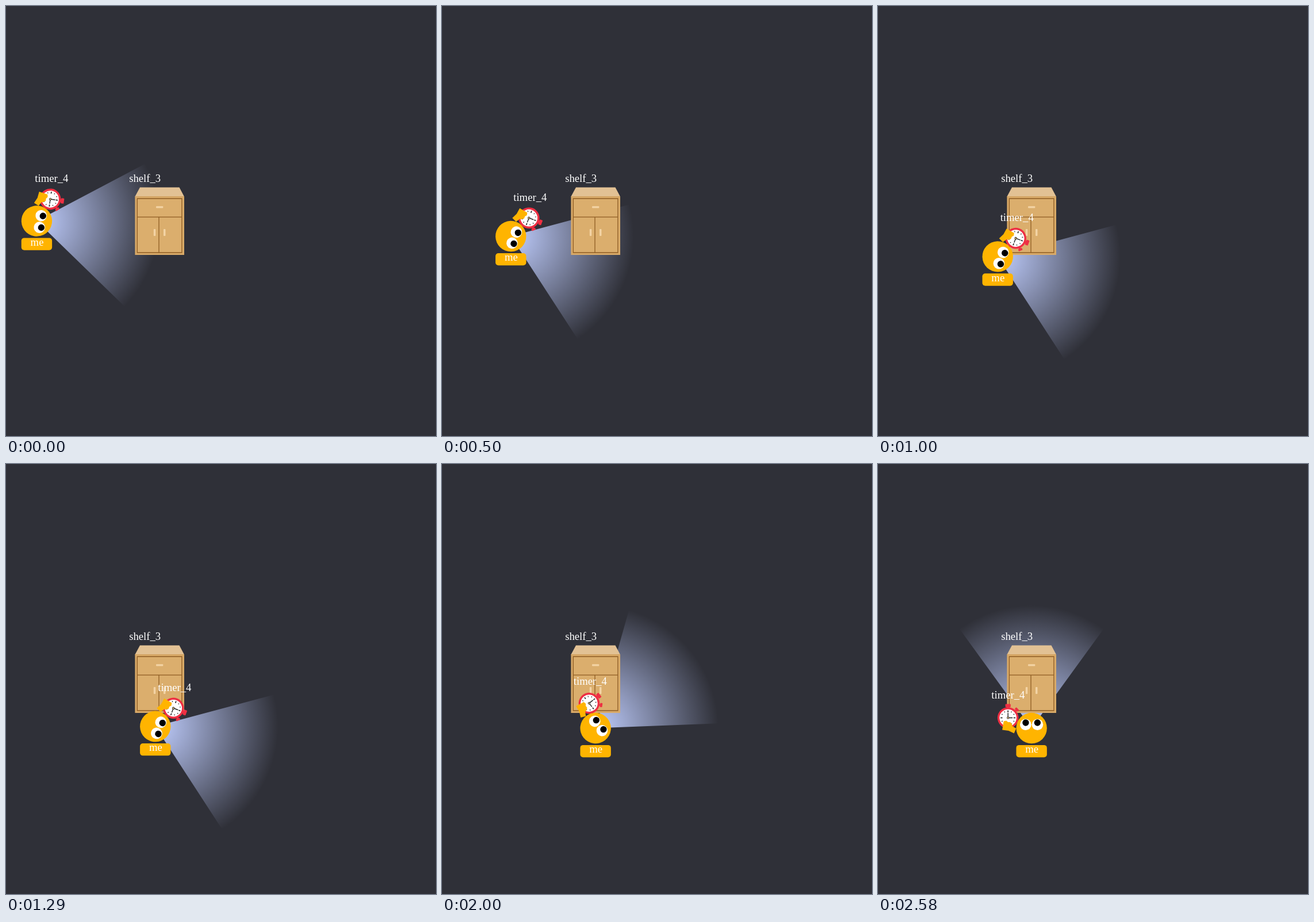
An HTML page that plays this animation: 748 px wide and 748 px high, repeating every 2870 ms.

```html
<!DOCTYPE html>
<html lang="en">
<head>
<meta charset="utf-8">
<title>Carrying the timer</title>
<style>
  html, body { margin: 0; width: 100%; height: 100%; overflow: hidden; background: #2f3038; }
  svg { display: block; width: 100vw; height: 100vh; }
  text { font: 18.7px "Liberation Serif", "Times New Roman", serif; fill: #fff; text-anchor: middle; }
</style>
</head>
<body>
<svg viewBox="0 0 748 748">
  <defs>
    <radialGradient id="beam" gradientUnits="userSpaceOnUse" cx="0" cy="0" r="213.7">
      <stop offset="0" stop-color="#c0ceff"/>
      <stop offset="1" stop-color="#c0ceff" stop-opacity="0"/>
    </radialGradient>
  </defs>
  <rect width="748" height="748" fill="#2f3038"/>

  <path id="cone" fill="url(#beam)"/>

  <g id="shelf">
    <path d="M233 315.4H301.5L310 331.5H224.4Z" fill="#e2c194"/>
    <rect x="224.4" y="331" width="85.6" height="102" fill="#d9aa68"/>
    <path d="M224.4 331.5H310" stroke="#cf9f5e"/>
    <rect x="228.3" y="335" width="77.6" height="94" fill="#dbae6d"/>
    <path d="M228.3 335H305.9V429H228.3ZM228.3 367.2H305.9M266 367.2V429" fill="none" stroke="#8e5c23" stroke-width="1.3"/>
    <g fill="#f3d3a4">
      <rect x="261" y="348.3" width="12.3" height="3.3" rx="1"/>
      <rect x="256.8" y="388" width="3.5" height="12" rx="1"/>
      <rect x="274" y="388" width="3.5" height="12" rx="1"/>
    </g>
    <text x="241.7" y="306">shelf_3</text>
  </g>

  <g id="body">
    <!-- drawn facing up -->
    <g id="turn">
      <g transform="translate(-41 -18)">
        <g fill="#ee2f43">
          <rect x="-4.6" y="-24" width="9.2" height="5.4" rx="1"/>
          <rect x="-2.2" y="-20" width="4.4" height="4"/>
          <g transform="rotate(47)">
            <rect x="-3.6" y="-23.2" width="7.2" height="4" rx="1"/>
            <rect x="-1.6" y="-20" width="3.2" height="4"/>
          </g>
          <circle r="18.3"/>
        </g>
        <circle r="14.8" fill="#fff"/>
        <g id="ticks" stroke="#222"></g>
        <path d="M0 0V-8.5M0 0H8" stroke="#222" stroke-width="1.4"/>
        <circle r="1.7" fill="#e8c27a" stroke="#222" stroke-width=".9"/>
      </g>
      <path d="M-51 3L-48.5 -12L-44 -13L-41 -10.5L-37 -10.5L-34 -6.5L-33.5 -3.5L-26.8 .5L-30.5 9L-40 4.5Z" fill="#ffb400"/>
      <circle r="26.7" fill="#ffb400"/>
      <g fill="#fff"><circle cx="-10.3" cy="-6.3" r="9.8"/><circle cx="10.3" cy="-6.3" r="9.8"/></g>
      <g fill="#000"><circle cx="-10.2" cy="-9.5" r="5.7"/><circle cx="10.2" cy="-9.5" r="5.7"/></g>
    </g>
    <rect x="-26.7" y="29.4" width="53.4" height="21.4" rx="5" fill="#ffb400"/>
    <text x="0.6" y="42.8">me</text>
  </g>
  <text id="tag">timer_4</text>
</svg>
<script>
  const $ = id => document.getElementById(id);
  const LOOP = 2870, STEP = 1000 / 24, LAST = 62;
  const TURNED = 3, ARRIVED = 32;
  const FROM = [53.43, 374], TO = [267.14, 459.5];
  const REACH = 213.7, HALF = 36;

  const part = (n, a, b) => Math.min(1, Math.max(0, (n - a) / (b - a)));
  const mix = (a, b, k) => a + (b - a) * k;
  const polar = (r, deg) => [r * Math.cos(deg * Math.PI / 180), r * Math.sin(deg * Math.PI / 180)];

  for (let i = 0; i < 12; i++) {
    const tick = document.createElementNS("http://www.w3.org/2000/svg", "path");
    const big = i % 3 === 0;
    tick.setAttribute("d", big ? "M0 -13V-9.6" : "M0 -12.8V-10.8");
    tick.setAttribute("stroke-width", big ? 1.6 : 1.1);
    tick.setAttribute("transform", `rotate(${i * 30})`);
    $("ticks").append(tick);
  }

  const [ax, ay] = polar(REACH, -HALF), [bx, by] = polar(REACH, HALF);
  $("cone").setAttribute("d", `M0 0L${ax} ${ay}A${REACH} ${REACH} 0 0 1 ${bx} ${by}Z`);

  // turn to the path, walk, then turn up to the shelf
  function draw(ms) {
    const n = Math.min(LAST, Math.floor((ms % LOOP + 4) / STEP));
    const walk = part(n, TURNED, ARRIVED);
    const x = mix(FROM[0], TO[0], walk), y = mix(FROM[1], TO[1], walk);
    const angle = n < ARRIVED ? mix(8.2, 21, part(n, 0, TURNED)) : mix(21, -90, part(n, ARRIVED, LAST));
    const [tx, ty] = polar(45.5, angle - 63.5);

    $("cone").setAttribute("transform", `translate(${x} ${y}) rotate(${angle})`);
    $("body").setAttribute("transform", `translate(${x} ${y})`);
    $("turn").setAttribute("transform", `rotate(${angle + 90})`);
    $("tag").setAttribute("x", x + tx);
    $("tag").setAttribute("y", y + ty - 31);
  }

  let start;
  function tick(now) {
    start ??= now;
    draw(now - start);
    requestAnimationFrame(tick);
  }
  draw(0);
  requestAnimationFrame(tick);
</script>
</body>
</html>
```
